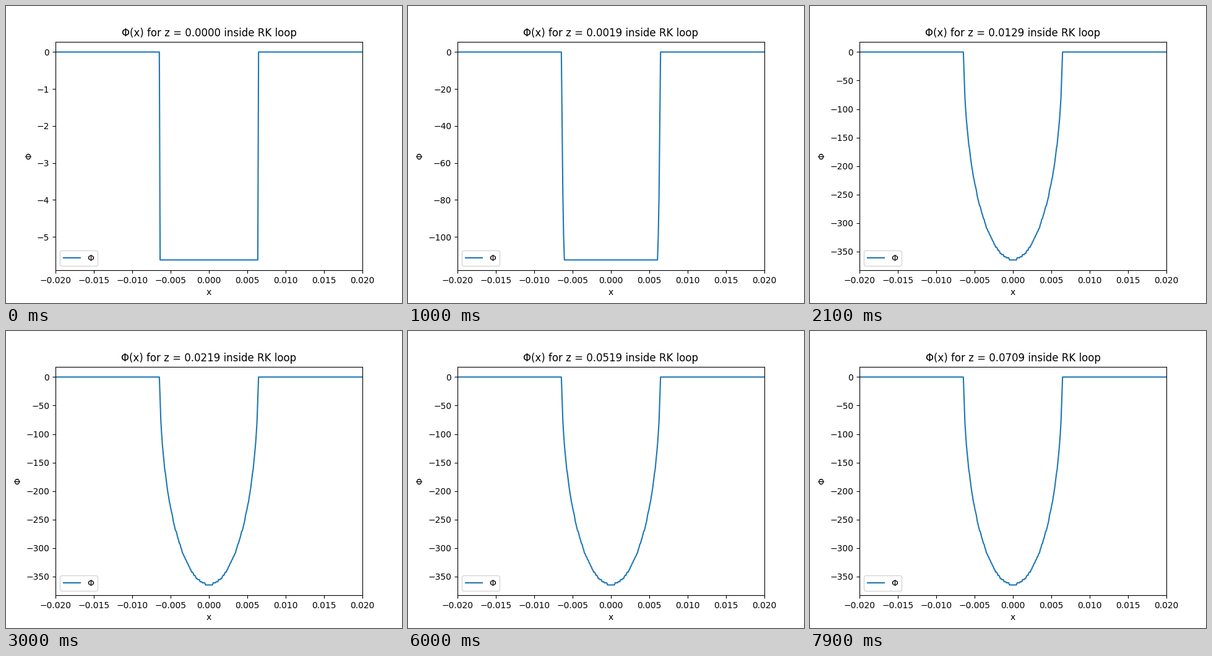
Write a matplotlib script that moves like this. It is 640 px wide and 480 px high and loops after 8 s.

```python
import numpy as np
import matplotlib.pyplot as plt
from matplotlib.animation import FuncAnimation

FRAMES, INTERVAL = 80, 100
DZ = 1e-4           # integration step along z
RADIUS = 6.4e-3     # radius of the lens
CENTRE = 7e-5       # z of its centre
SLOPE = -56250.0    # dPhi/dz inside the lens

x = np.linspace(-0.02, 0.02, 400)


def rate(z):
    inside = x[None, :] ** 2 + (z[:, None] - CENTRE) ** 2 <= RADIUS ** 2
    return np.where(inside, SLOPE, 0.0)


def integrate(steps):
    """Phi after each Runge-Kutta step, starting from zero."""
    z = np.arange(steps) * DZ
    slope = (rate(z) + 4 * rate(z + DZ / 2) + rate(z + DZ)) / 6
    return np.cumsum(slope * DZ, axis=0)


def step_at(frame):
    """Index of the step on show: single steps first, then every tenth."""
    if frame < 9:
        return max(frame - 1, 0)
    return 10 * (frame - 9) + 9


phi = integrate(step_at(FRAMES - 1) + 1)

fig, ax = plt.subplots(figsize=(6.4, 4.8), dpi=100)
line, = ax.plot(x, phi[0], label="Φ")
ax.set_xlim(-0.02, 0.02)
ax.set_xlabel("x")
ax.set_ylabel("Φ")
ax.legend(loc="lower left")
title = ax.set_title("")


def update(frame):
    i = step_at(frame)
    line.set_ydata(phi[i])
    low = phi[i].min()
    ax.set_ylim(1.05 * low, -0.05 * low)
    title.set_text(f"Φ(x) for z = {i * DZ:.4f} inside RK loop")
    return line, title


anim = FuncAnimation(fig, update, frames=FRAMES, interval=INTERVAL,
                     init_func=lambda: update(0), repeat=True, repeat_delay=0)
plt.show()
```
